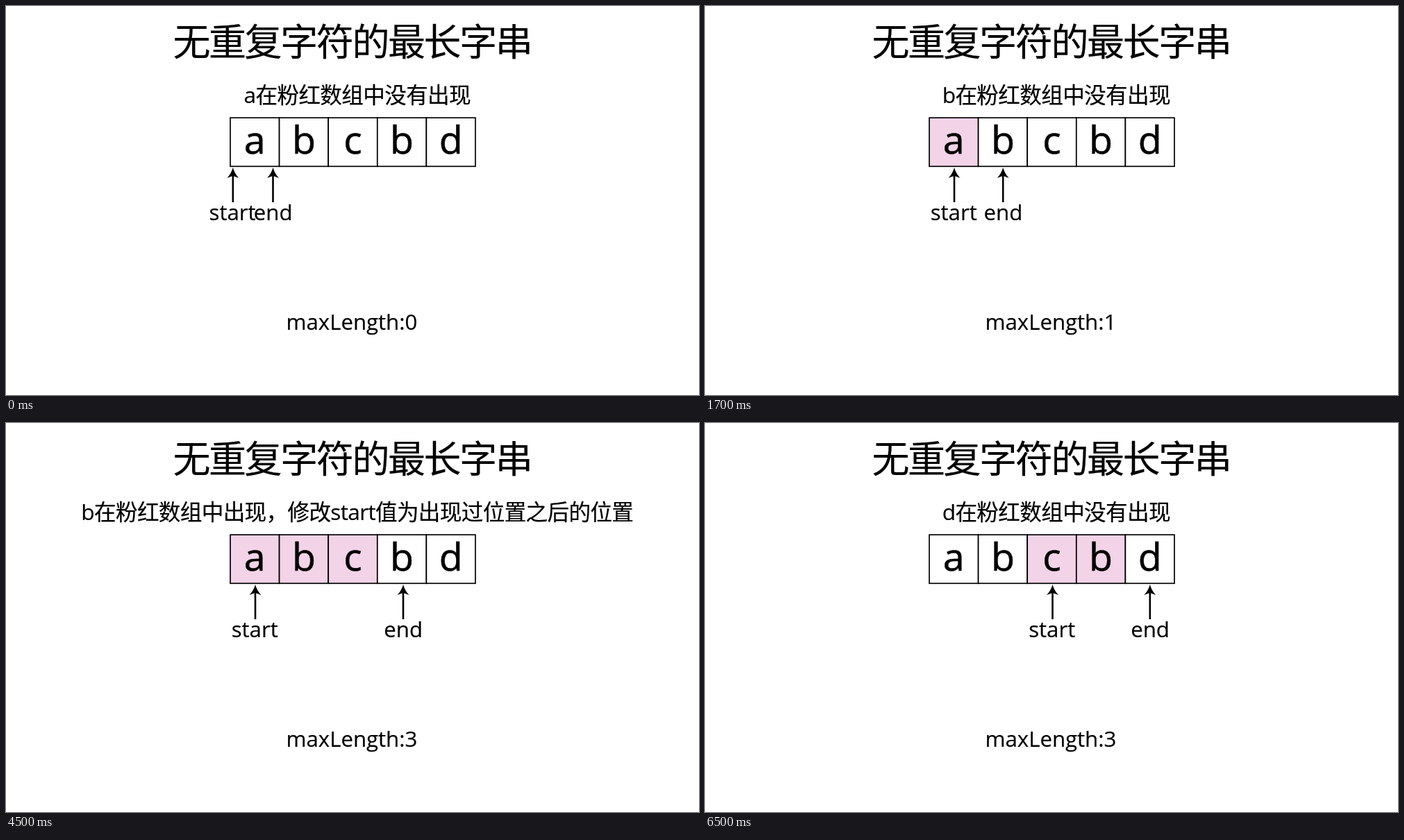
Animation, 998 px wide and 561 px high, one loop 8 s. Source, as an HTML page:

```html
<!DOCTYPE html>
<html lang="zh-CN">
<head>
<meta charset="utf-8">
<style>
html, body { margin: 0; width: 100%; height: 100%; overflow: hidden; background: #fff; }
svg { display: block; width: 998px; height: 561px; }
text { font-family: "Open Sans", "Noto Sans CJK SC", "Noto Sans CJK", sans-serif; fill: #000; stroke: #000; stroke-width: .2; text-anchor: middle; }
.title { font-size: 54px; letter-spacing: -2.4px; }
.note { font-size: 31.6px; letter-spacing: -.65px; }
.label { font-size: 31.2px; }
.letter { font-size: 55.5px; stroke-width: .6; }
.cell { stroke: #000; stroke-width: 1.7; }
</style>
</head>
<body>
<svg viewBox="0 0 998 561" lang="zh-CN">
  <defs>
    <g id="arrow">
      <path d="M0 283V242" stroke="#000" stroke-width="2.6"/>
      <path d="M0 233Q2.5 242 8.5 248L0 245L-8.5 248Q-2.5 242 0 233Z"/>
    </g>
  </defs>
  <text class="title" x="498.4" y="72.2">无重复字符的最长字串</text>
  <text class="note" id="note" x="505.8" y="140"></text>
  <g id="cells"></g>
  <g id="start"><use href="#arrow"/><text class="label" x="-.8" y="309">start</text></g>
  <g id="end"><use href="#arrow"/><text class="label" x=".2" y="309">end</text></g>
  <text class="label" id="max" style="text-anchor:start" x="403.5" y="467"></text>
</svg>
<script>
const LOOP = 8000, PINK = '#f3d3e7', LEFT = 323, CELL = 70.6;
const absent = c => c + '在粉红数组中没有出现';
// pink: first and one-past-last highlighted cell
const steps = [
  { at: 0, note: absent('a'), start: 326.8, end: 384.5, pink: [0, 0], max: 0 },
  { at: 500, note: absent('b'), start: 359, end: 429.2, pink: [0, 1], max: 1 },
  { at: 2500, note: absent('c'), start: 359, end: 500.5, pink: [0, 2], max: 2 },
  { at: 4500, note: 'b在粉红数组中出现，修改start值为出现过位置之后的位置', start: 359, end: 572, pink: [0, 3], max: 3 },
  { at: 6500, note: absent('d'), start: 500.5, end: 640.8, pink: [2, 4], max: 3 }
];
const $ = id => document.getElementById(id);

function add(name, attrs, text = '') {
  const el = document.createElementNS('http://www.w3.org/2000/svg', name);
  for (const key in attrs) el.setAttribute(key, attrs[key]);
  el.textContent = text;
  return $('cells').appendChild(el);
}

const cells = [...'abcbd'].map((c, i) => {
  const x = LEFT + i * CELL;
  const rect = add('rect', { class: 'cell', x, y: 161.2, width: CELL, height: 70.1, fill: '#fff' });
  add('text', { class: 'letter', x: x + CELL / 2, y: 213 }, c);
  return rect;
});

let shown;
function show(step) {
  if (step === shown) return;
  shown = step;
  $('note').textContent = step.note;
  $('max').textContent = 'maxLength:' + step.max;
  for (const id of ['start', 'end']) $(id).setAttribute('transform', `translate(${step[id]})`);
  cells.forEach((rect, i) => {
    rect.setAttribute('fill', i >= step.pink[0] && i < step.pink[1] ? PINK : '#fff');
  });
}

function tick() {
  const t = performance.now() % LOOP;
  show(steps.findLast(s => s.at <= t));
  requestAnimationFrame(tick);
}
tick();
</script>
</body>
</html>
```
